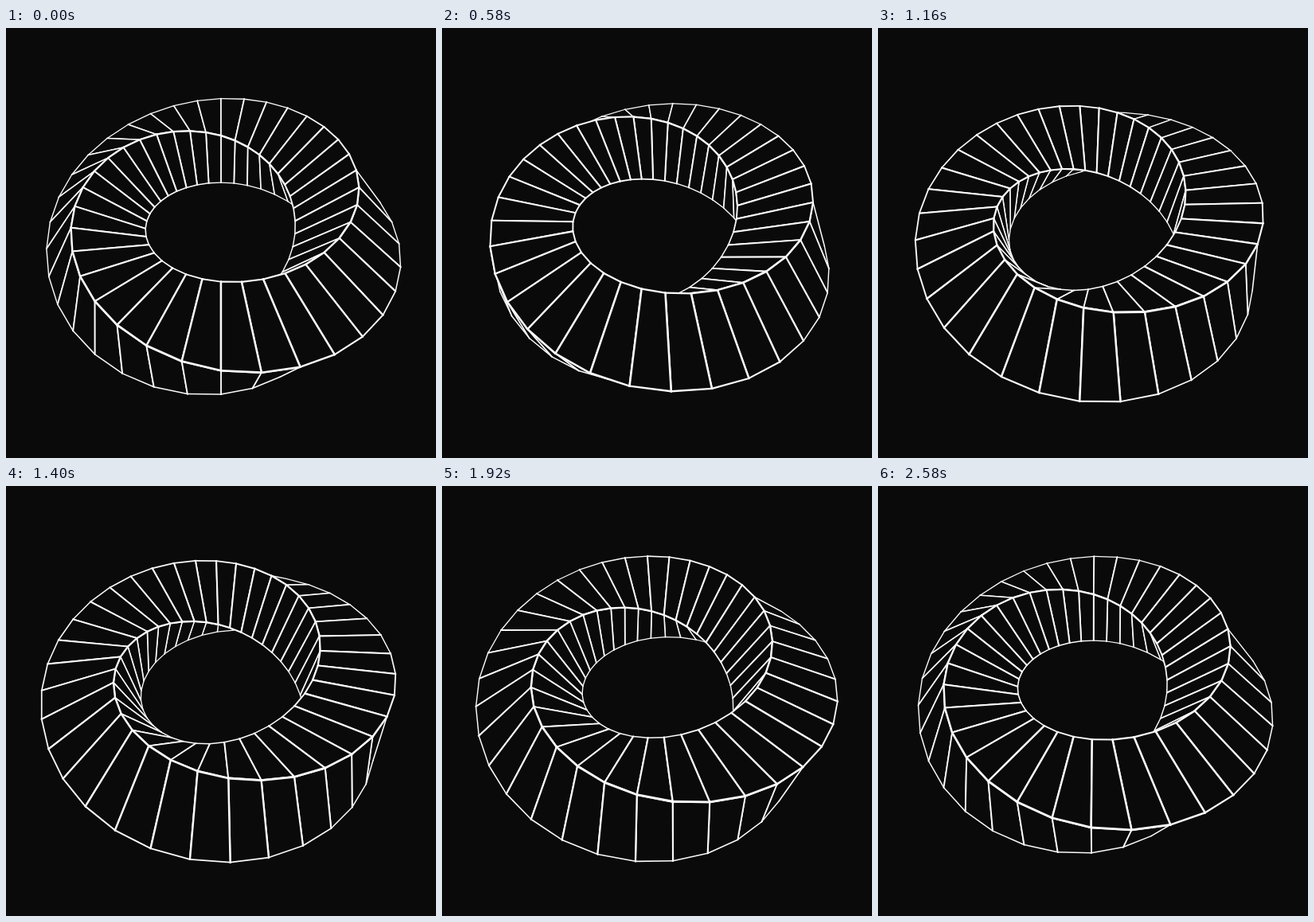
An HTML page with a canvas for the animation above (2.6 s loop, 540 by 540 pixels).

```html
<!DOCTYPE html>
<html lang="en">
<head>
<meta charset="utf-8">
<title>Twisted ring</title>
<style>
  html, body { margin: 0; width: 100%; height: 100%; overflow: hidden; background: #0a0a0a; }
  canvas { display: block; width: 100vw; height: 100vh; }
</style>
</head>
<body>
<canvas id="stage" width="540" height="540"></canvas>
<script>
const ctx = document.getElementById('stage').getContext('2d');
const BG = '#0a0a0a', INK = '#fafafa';
const LOOP = 2600, TICK = 20;
const SEGMENTS = 36, SIDES = 4;
const RADIUS = 154, CORNER = 61, RAISE = 27;
const CAMERA = 470, SIN = 0.813, COS = Math.sqrt(1 - SIN * SIN);
const THIN = 1.38, BOLD = 0.75;

const rad = deg => deg * Math.PI / 180;
const minus = (p, q) => p.map((v, n) => v - q[n]);
const dot = (p, q) => p.reduce((sum, v, n) => sum + v * q[n], 0);
const cross = ([a, b, c], [d, e, f]) => [b * f - c * e, c * d - a * f, a * e - b * d];

// Corner k of the square section at rib i, with half a twist per turn.
function corner(i, k, t) {
  const around = 360 / SEGMENTS * i - 60 * t;
  const turn = rad(around / 2 - 90 * t - 46 + 90 * k);
  const a = rad(around);
  const rho = RADIUS + CORNER * Math.cos(turn);
  const z = CORNER * Math.sin(turn);
  const x = -rho * Math.sin(a), y = rho * Math.cos(a);
  const up = RAISE + z * COS - y * SIN;
  const depth = CAMERA - y * COS - z * SIN;
  const s = CAMERA / depth;
  return { x: 270 + x * s, y: 270 - up * s, s, cam: [x, up, depth] };
}

// Facing is 1 when the quad looks straight at the camera, negative when turned away.
function makeFace(pts) {
  const [a, b, c, d] = pts.map(p => p.cam);
  const mid = a.map((v, n) => (v + b[n] + c[n] + d[n]) / 4);
  const normal = cross(minus(c, a), minus(d, b));
  const far = Math.hypot(...mid);
  return { pts, far, facing: -dot(normal, mid) / (Math.hypot(...normal) * far) };
}

function buildFaces(t) {
  const faces = [];
  for (let i = 0; i < SEGMENTS; i++) {
    const strip = [];
    for (let k = 0; k < SIDES; k++) {
      strip.push(makeFace([
        corner(i, k, t), corner(i + 1, k, t), corner(i + 1, k + 1, t), corner(i, k + 1, t)
      ]));
    }
    strip.forEach((face, k) => {
      face.before = face.facing + strip[(k + SIDES - 1) % SIDES].facing;
      face.after = face.facing + strip[(k + 1) % SIDES].facing;
      if (face.facing > 0) faces.push(face);
    });
  }
  return faces.sort((f, g) => g.far - f.far);
}

// Edges turned towards the viewer are bolder.
function edge(p, q, facing) {
  ctx.lineWidth = (THIN + BOLD * Math.max(0, facing)) * Math.sqrt((p.s + q.s) / 2);
  ctx.beginPath();
  ctx.moveTo(p.x, p.y);
  ctx.lineTo(q.x, q.y);
  ctx.stroke();
}

function draw(t) {
  ctx.fillStyle = BG;
  ctx.fillRect(0, 0, 540, 540);
  ctx.strokeStyle = INK;
  ctx.lineCap = 'round';
  for (const { pts: [a, b, c, d], before, after, facing } of buildFaces(t)) {
    ctx.beginPath();
    for (const p of [a, b, c, d]) ctx.lineTo(p.x, p.y);
    ctx.fill();
    edge(a, b, before);
    edge(c, d, after);
    edge(b, c, facing);
    edge(d, a, facing);
  }
}

function tick() {
  const now = Math.floor(performance.now() % LOOP / TICK) * TICK;
  draw(now / LOOP);
  requestAnimationFrame(tick);
}
tick();
</script>
</body>
</html>
```
